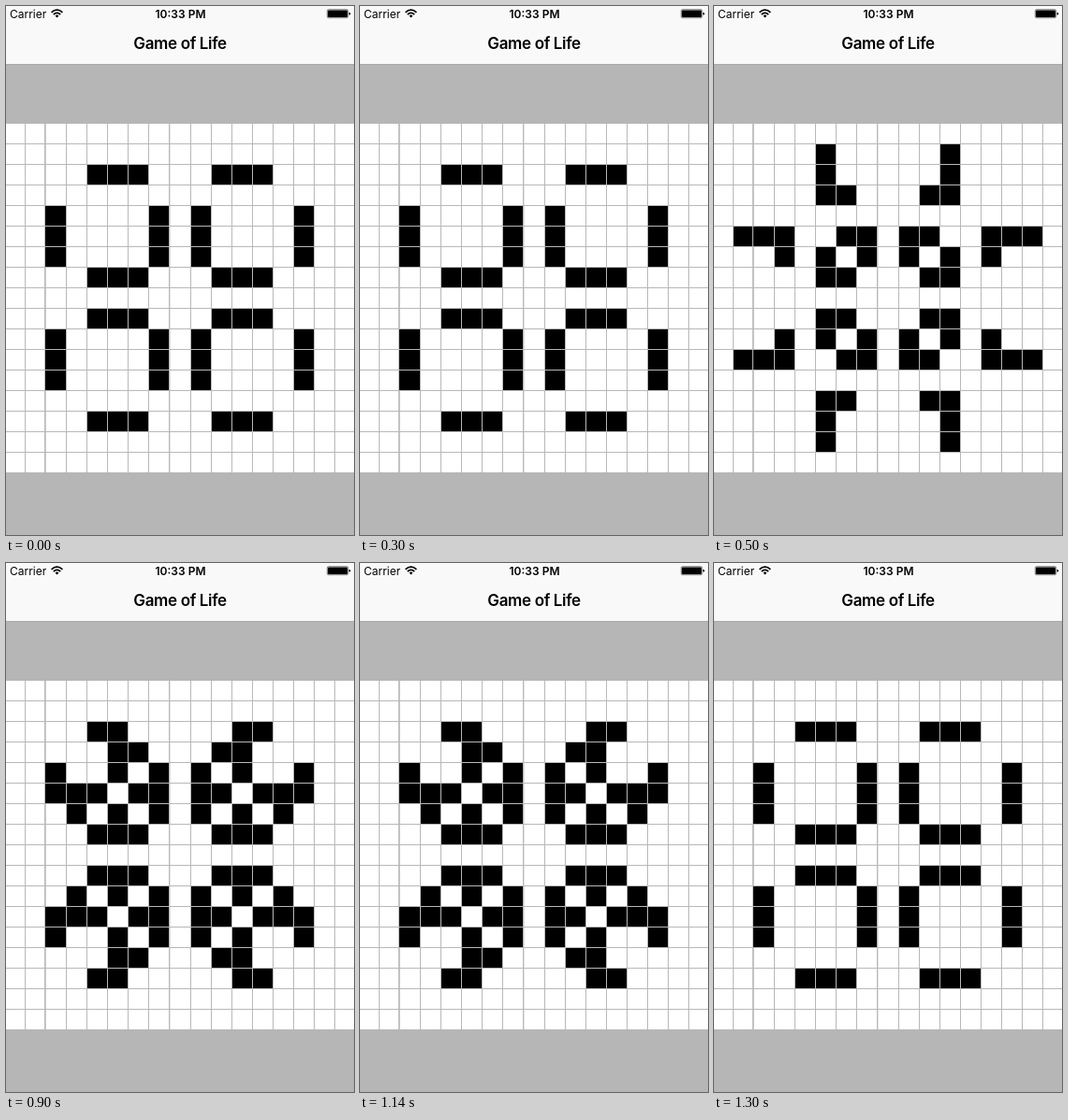
Recreate the animation shown at these times as an HTML page. Size 372 px wide and 566 px high, loop 1.7 s.

```html
<!DOCTYPE html>
<html lang="en">
<head>
<meta charset="utf-8">
<title>Game of Life</title>
<style>
  html, body { margin: 0; width: 100%; height: 100%; overflow: hidden; background: #b6b6b6; }
  svg { display: block; width: 372px; height: 566px; }
  text { font-family: Inter, Roboto, sans-serif; fill: #000; }
  .status { font-size: 12px; }
  .bold { font-weight: 600; text-anchor: middle; }
  .title { font-size: 17px; letter-spacing: -0.35px; }
</style>
</head>
<body>
<svg viewBox="0 0 372 566">
  <rect width="372" height="62" fill="#f9f9f9"/>
  <rect y="62" width="372" height="1" fill="#a9a9a9"/>

  <text class="status" x="4" y="13">Carrier</text>
  <g fill="none" stroke="#000" stroke-width="1.8">
    <path d="M48.6 6.8Q54.5 1.4 60.4 6.8M50.8 9.1Q54.5 5.7 58.2 9.1"/>
    <path d="M52.6 10.4Q54.5 8.8 56.4 10.4L54.5 12.5Z" fill="#000" stroke="none"/>
  </g>
  <text class="status bold" x="186.5" y="13">10:33 PM</text>
  <rect x="343.25" y="3.75" width="22.5" height="9" rx="1.6" fill="none" stroke="#000" stroke-width=".5"/>
  <rect x="344" y="4.5" width="21" height="7.5" rx="1"/>
  <path d="M366.6 6.7Q368.2 7 368.2 8.25T366.6 9.8Z"/>
  <text class="title bold" x="186" y="46">Game of Life</text>

  <rect y="126" width="372" height="373" fill="#fff"/>
  <path id="lines" fill="#b8b8b8"/>
  <path id="cells" shape-rendering="crispEdges"/>
</svg>
<script>
  const SIZE = 17, PITCH = 375 / SIZE, LOOP = 1700;
  const lineX = k => Math.round(-2 + k * PITCH) - (k === 2 ? 1 : 0);
  const lineY = k => Math.min(499, Math.floor(125 + k * PITCH));
  const box = (x, y, w, h) => `M${x} ${y}h${w}v${h}h${-w}z`;
  const range = [...Array(SIZE).keys()];

  const arms = [2, 7, 9, 14], spans = [4, 5, 6, 10, 11, 12];
  const pulsar = (x, y) =>
    arms.includes(x) && spans.includes(y) || arms.includes(y) && spans.includes(x);

  function nextGeneration(grid) {
    const alive = (x, y) => grid[y]?.[x] ? 1 : 0;
    return grid.map((row, y) => row.map((cell, x) => {
      let count = -alive(x, y);
      for (let dy = -1; dy <= 1; dy++)
        for (let dx = -1; dx <= 1; dx++) count += alive(x + dx, y + dy);
      return count === 3 || cell && count === 2;
    }));
  }

  function cellPath(grid) {
    let path = '';
    for (const y of range) for (const x of range) {
      if (!grid[y][x]) continue;
      const left = lineX(x) + 1, top = lineY(y) + 1;
      path += box(left, top, lineX(x + 1) - left, lineY(y + 1) - top);
    }
    return path;
  }

  // A few column lines straddle two pixels and look heavier.
  const lineWidth = k => k === 2 ? 1.7 : k === 8 ? 1.4 : 1;
  document.getElementById('lines').setAttribute('d', range.slice(1).map(k =>
    box(lineX(k), 126, lineWidth(k), 373) + box(0, lineY(k), 372, 1)).join(''));

  const first = range.map(y => range.map(x => pulsar(x, y)));
  const second = nextGeneration(first);
  const paths = [first, second, nextGeneration(second)].map(cellPath);
  const cells = document.getElementById('cells');
  let shown = -1;

  function draw() {
    const t = performance.now() % LOOP;
    const phase = t < 500 || t >= 1300 ? 0 : t < 900 ? 1 : 2;
    if (phase !== shown) cells.setAttribute('d', paths[shown = phase]);
    requestAnimationFrame(draw);
  }
  draw();
</script>
</body>
</html>
```
